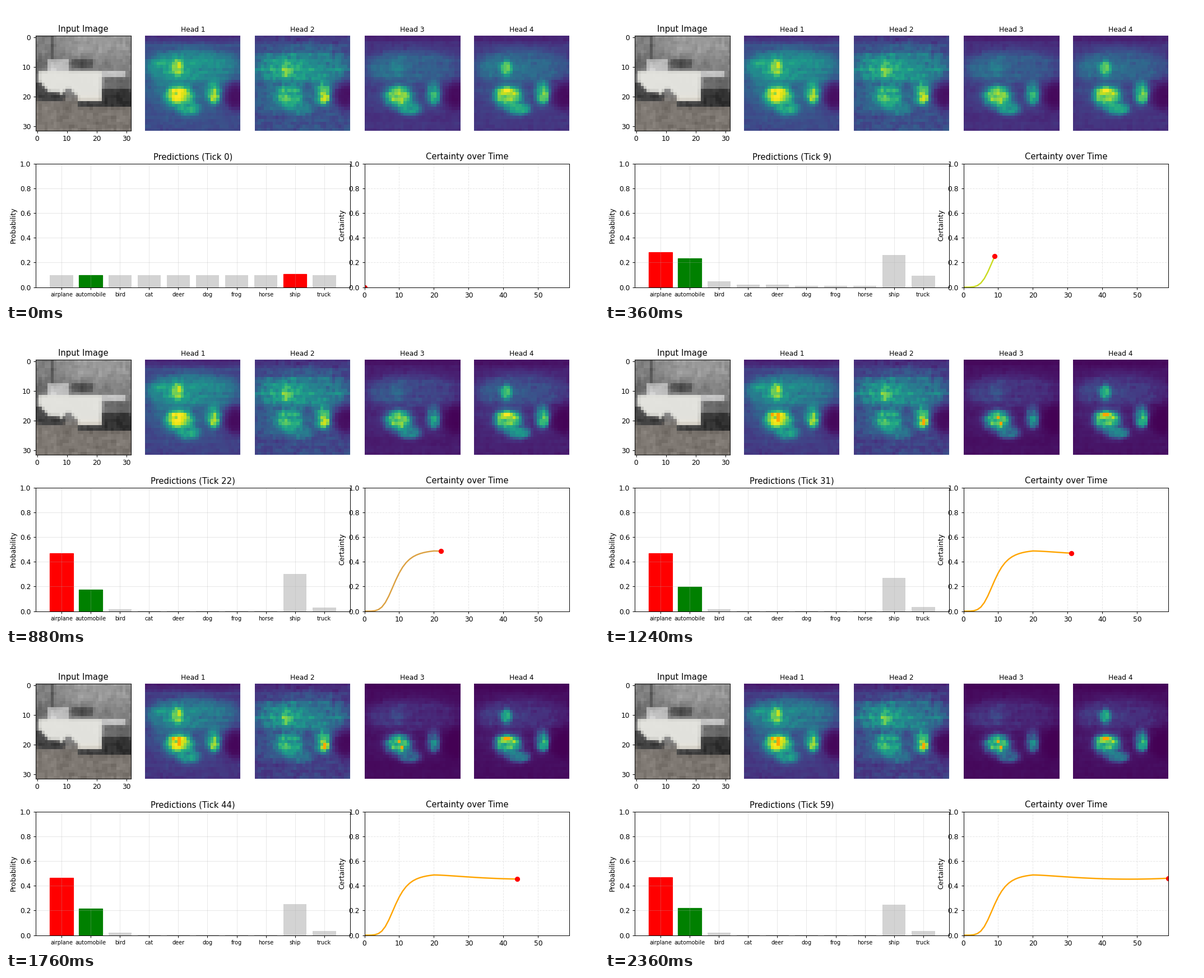
A matplotlib script for the animation above (2400 ms loop, 1058 by 529 pixels).

```python
import numpy as np
import matplotlib.pyplot as plt
from matplotlib.animation import FuncAnimation
from matplotlib.gridspec import GridSpec

plt.rcParams["font.family"] = "DejaVu Sans"
WIDTH_PX, WIDTH_IN, HEIGHT_IN = 1058, 12, 6
TICKS, SIZE = 60, 32
CLASSES = ["airplane", "automobile", "bird", "cat", "deer",
           "dog", "frog", "horse", "ship", "truck"]
AUTO, SHIP, TRUCK = 1, 8, 9
rng = np.random.default_rng(4)
Y, X = np.mgrid[0:SIZE, 0:SIZE].astype(float)


def smoothstep(t, start, end):
    u = np.clip((t - start) / (end - start), 0, 1)
    return u * u * (3 - 2 * u)


def certainty_at(t):
    """Steep rise around tick 9, then a slow dip with its low at tick 48."""
    rise = t ** 4.5 / (t ** 4.5 + 9 ** 4.5)
    return rise * (.4535 + 6e-5 * (48 - np.maximum(t, 20)) ** 2)


ticks = np.arange(TICKS)
certainty = certainty_at(ticks.astype(float))
lean = np.array([0, -.2, -1.75, -2.7, -2.7, -3.1, -3.1, -3.1, -.1, -1.1])


def probs_at(t):
    """Softmax whose contrast grows with certainty."""
    x = certainty[t] / certainty[9]
    logits = lean * max(x, np.sqrt(x))
    settle = smoothstep(t, 9, 22)
    late = 1 - np.exp(-max(t - 22, 0) / 12)
    logits[AUTO] += settle * (.22 * late - .6)
    logits[SHIP] += settle * (-.2 * late - .26) + .06 * np.exp(-t / 5)
    logits[TRUCK] -= .6 * settle
    p = np.exp(logits)
    return p / p.sum()


def soften(a, amount):
    """Mix each cell with its four neighbours."""
    p = np.pad(a, [(1, 1), (1, 1)] + [(0, 0)] * (a.ndim - 2), mode="edge")
    near = (p[:-2, 1:-1] + p[2:, 1:-1] + p[1:-1, :-2] + p[1:-1, 2:]) / 4
    return (1 - amount) * a + amount * near


def make_head(base, band, cab, left, right, grain):
    """Attention map: a band over the roof, a cab spot and two wheel spots."""
    v = np.full((SIZE, SIZE), base)

    def pull(cx, cy, rx, ry, level):
        d = ((X - cx) / rx) ** 2 + ((Y - cy) / ry) ** 2
        v[:] += (level - v) * np.exp(-d ** 2)

    pull(16, -1, 40, 3, .6 * base)
    pull(13, 15, 14, 11, (base + band) / 2)
    pull(16, 10, 16, 5.5, band)
    pull(9, 10.5, 8, 4, 1.15 * band)
    pull(10.4, 10.6, 2.2, 2.6, cab)
    pull(17.5, 19, 2.4, 4, (2 * base + band) / 3)
    pull(14.5, 24, 4, 2.4, .65 * left)
    pull(11, 20, 5, 4, .78 * left)
    pull(10.7, 19.5, 3.8, 2.7, left)
    pull(22.4, 18.8, 2.5, 4.2, .75 * right)
    pull(22.8, 20, 1.5, 2.3, right)
    pull(30, 20, 4.2, 5, .2 * base)
    noise = soften(rng.normal(size=v.shape), .4) + .4 * rng.normal(size=(SIZE, 1))
    return np.clip(v * (1 + grain * noise), 0, 1)


heads = [make_head(.23, .52, .92, .91, .84, .09),
         make_head(.24, .5, .78, .68, .9, .16),
         make_head(.15, .31, .45, .84, .68, .1),
         make_head(.16, .34, .74, .88, .84, .1)]
sharpen = [.28, .22, .9, .9]
viridis = plt.get_cmap("viridis")


def head_rgba(k, t):
    """Contrast sharpens over time; the two hottest cells end up orange."""
    v = heads[k]
    rgba = viridis(v ** (1 + sharpen[k] / (1 + np.exp(-(t - 25) / 6))))
    if t >= 28:
        rgba[v >= np.sort(v, axis=None)[-2], :3] = (1, .65, 0)
    return rgba


def vehicle_scene():
    """A pale vehicle between a grey wall and brown ground, in flat shapes."""
    gray = 128 + 22 * smoothstep(X, 0, 18) - 22 * smoothstep(Y, 4, 9)
    gray[20:] = 118
    for x0, x1, y0, y1, level in [
            (5, 6, 0, 8, 84), (4, 11, 8, 12, 192), (12, 19, 8, 11, 76),
            (22, 30, 12, 14, 200), (23, 32, 14, 18, 106), (0, 10, 16, 22, 66),
            (22, 32, 18, 24, 50), (14, 23, 22, 24, 58)]:
        gray[y0:y1, x0:x1] = level
    lower = np.interp(X, [0, 4, 8, 10, 12, 14, 21], [15, 18, 19, 17, 18, 21, 21])
    body = (Y >= 12) & (Y <= lower) & (X >= 1) & (X <= 21)
    gray[body] = 226
    gray = soften(gray, .35)
    gray += soften(rng.normal(size=gray.shape), .5) * np.where(body, 1, 11)
    warm = smoothstep(Y, 18, 23) * (gray > 80)
    img = np.stack([gray + 6 * warm, gray, gray - 6 * warm - 5 * body], axis=-1)
    return np.clip(img, 0, 255).astype(np.uint8)


fig = plt.figure(figsize=(WIDTH_IN, HEIGHT_IN), dpi=WIDTH_PX / WIDTH_IN)
grid = GridSpec(2, 5, figure=fig, height_ratios=[1, 1.3], hspace=.3, wspace=.15,
                left=.05, right=.95, top=.9, bottom=.05)

ax = fig.add_subplot(grid[0, 0])
ax.imshow(vehicle_scene(), interpolation="nearest")
ax.set_xticks(range(0, 31, 10))
ax.set_yticks(range(0, 31, 10))
ax.set_title("Input Image")

head_images = []
for k in range(4):
    ax = fig.add_subplot(grid[0, k + 1])
    head_images.append(ax.imshow(head_rgba(k, 0), interpolation="nearest"))
    ax.set_title(f"Head {k + 1}", fontsize=10)
    ax.axis("off")

bar_ax = fig.add_subplot(grid[1, :3])
bars = bar_ax.bar(CLASSES, probs_at(0))
bar_ax.set_ylim(0, 1)
bar_ax.tick_params(axis="x", labelsize=8)
bar_ax.set_ylabel("Probability")
bar_ax.grid(alpha=.3)
title = bar_ax.set_title("Predictions (Tick 0)")

line_ax = fig.add_subplot(grid[1, 3:])
line_ax.set_xlim(0, TICKS - 1)
line_ax.set_ylim(0, 1)
line_ax.set_title("Certainty over Time")
line_ax.set_xlabel("Tick")
line_ax.set_ylabel("Certainty")
line_ax.grid(alpha=.3, linestyle="--")
curve, = line_ax.plot([], [], lw=2)
dot, = line_ax.plot([], [], "ro", ms=6.5)


def curve_color(t):
    if t < 16:
        return "#cadb23"
    return "#dca142" if t < 28 else "orange"


def update(t):
    for k, im in enumerate(head_images):
        im.set_data(head_rgba(k, t))
    p = probs_at(t)
    best = np.argmax(p)
    for i, (bar, value) in enumerate(zip(bars, p)):
        bar.set_height(value)
        if i in (AUTO, best):
            bar.set_color("green" if i == AUTO else "red")
        else:
            bar.set(facecolor="lightgray", edgecolor="none")
    title.set_text(f"Predictions (Tick {t})")
    curve.set_data(ticks[:t + 1], certainty[:t + 1])
    curve.set_color(curve_color(t))
    dot.set_data([t], [certainty[t]])
    return [*head_images, *bars, title, curve, dot]


anim = FuncAnimation(fig, update, frames=TICKS, interval=40, repeat=True,
                     repeat_delay=0, blit=False)
plt.show()
```
